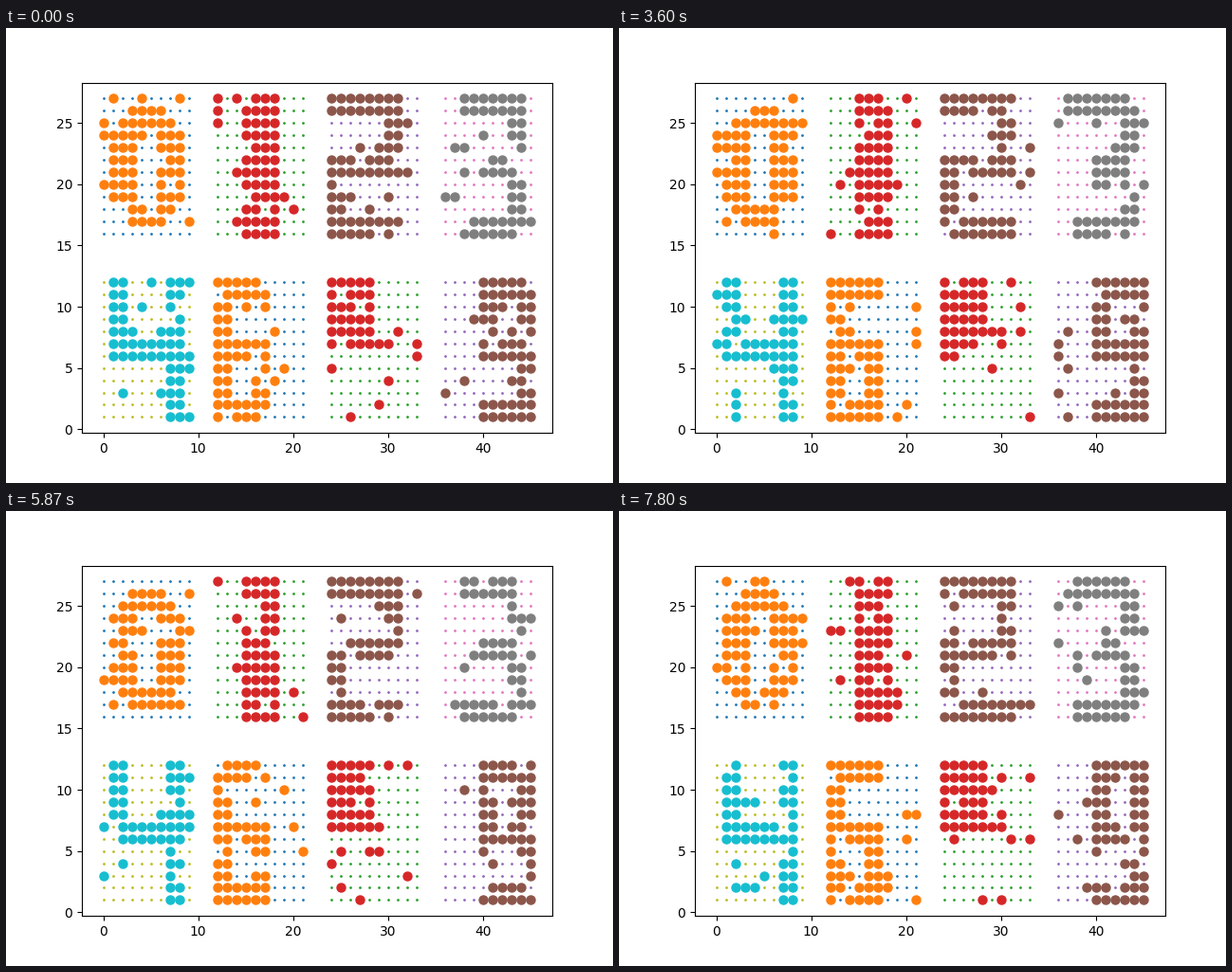
A matplotlib script that plays this animation: 640 px wide and 480 px high, repeating every 8000 ms.

```python
import numpy as np
import matplotlib.pyplot as plt
from matplotlib.animation import FuncAnimation

ROWS, COLS, FLIPS = 12, 10, 12
TICKS, LOOP_MS = 120, 8000

# The noise is renewed every second tick, restarting on each beat
BEATS = (14, 35, 44, 57, 58, 67, 78, 91, 102, 117, TICKS)
CHANGES = np.concatenate([np.arange(a, max(b - 1, a + 1), 2)
                          for a, b in zip(BEATS, BEATS[1:])])

row, col = np.indices((ROWS, COLS))


def box(top, bottom, left, right):
    """Grid filled inside the given rows and columns, ends included."""
    return (top <= row) & (row <= bottom) & (left <= col) & (col <= right)


def bars(left, right):
    """Three thick bars at the top, middle and bottom."""
    return (row % 5 < 2) & (left <= col) & (col <= right)


def mirror(grid):
    return grid | grid[::-1]


GLYPHS = [
    mirror(box(1, 1, 3, 6) | box(2, 2, 2, 7) | box(3, 5, 1, 3) | box(3, 5, 6, 8)),
    box(0, 11, 3, 6),
    bars(0, 7) | box(2, 4, 6, 7) | box(7, 9, 0, 1),
    mirror(box(0, 0, 2, 7) | box(1, 1, 2, 8) | box(2, 4, 7, 8) | box(5, 5, 4, 7)),
    box(0, 6, 1, 2) | box(5, 6, 1, 8) | box(0, 11, 7, 8),
    bars(0, 5) | box(0, 11, 0, 1) | box(7, 9, 4, 5),
    box(0, 5, 0, 4),
    bars(4, 9) | box(0, 6, 4, 5) | box(0, 11, 8, 9),
]

fig, ax = plt.subplots(figsize=(6.4, 4.8), dpi=100)
panels = []
for i, grid in enumerate(GLYPHS):
    x = col.ravel() + 12 * (i % 4)
    y = (27 if i < 4 else 12) - row.ravel()
    ax.plot(x, y, "o", ms=1, color=f"C{2 * i % 10}")
    dots, = ax.plot([], [], "o", ms=6.5, color=f"C{(2 * i + 1) % 10}")
    panels.append((dots, x, y, grid.ravel()))


def draw(tick):
    step = int(np.searchsorted(CHANGES, tick, side="right"))
    rng = np.random.default_rng(step)
    for dots, x, y, cells in panels:
        on = cells.copy()
        on[rng.choice(cells.size, FLIPS, replace=False)] ^= True
        dots.set_data(x[on], y[on])
    return [panel[0] for panel in panels]


anim = FuncAnimation(fig, draw, frames=TICKS, interval=LOOP_MS / TICKS,
                     repeat=True, repeat_delay=0, blit=False)
plt.show()
```
